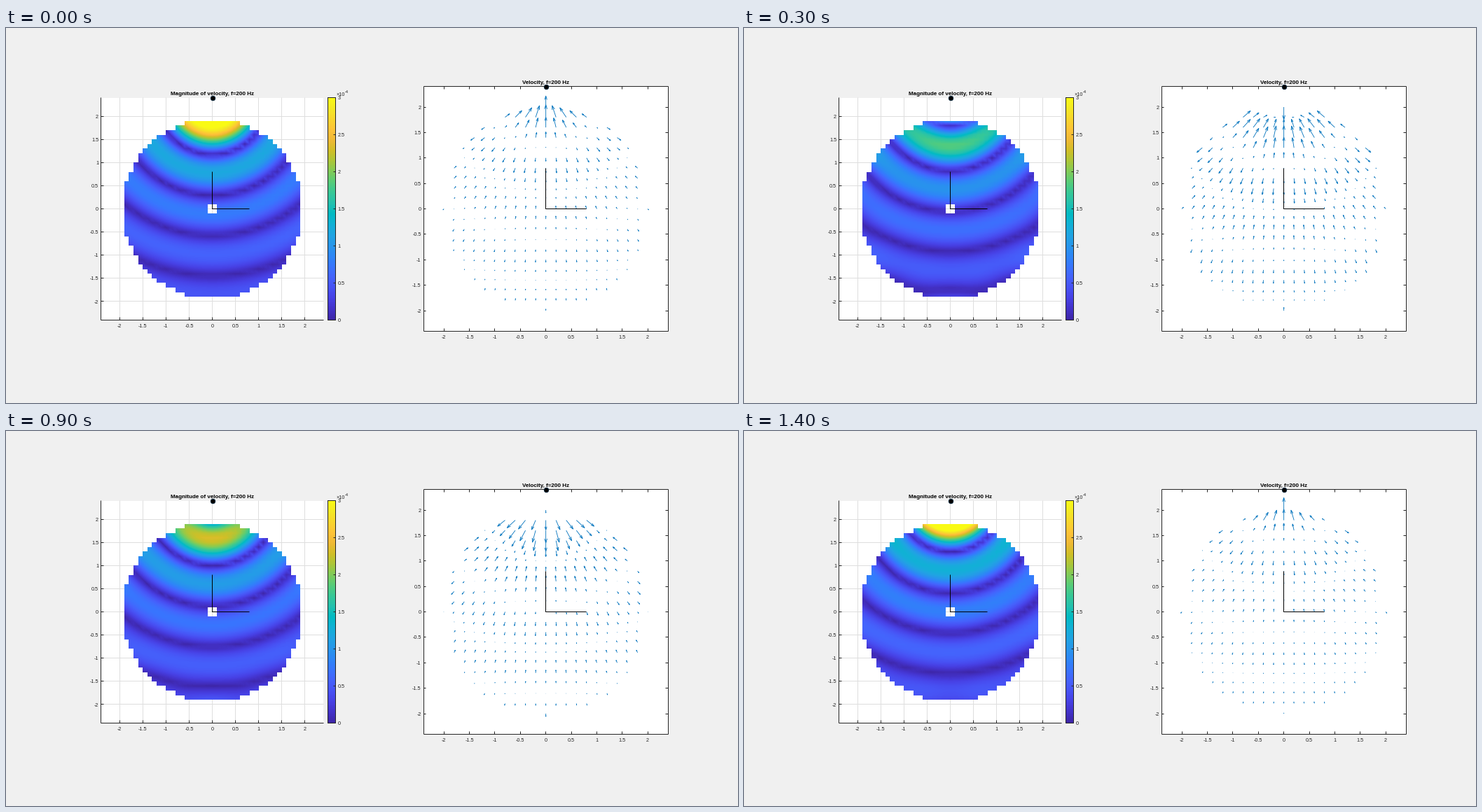
Write a matplotlib script that moves like this. It is 1045 px wide and 536 px high and loops after 1500 ms.

```python
import numpy as np
from numpy.polynomial import legendre
import matplotlib.pyplot as plt
from matplotlib.animation import FuncAnimation
from matplotlib.collections import LineCollection
from matplotlib.colors import LinearSegmentedColormap

W, H, DPI = 1045, 536, 100
STEPS = 15
PT = 72 / DPI                      # points per pixel
INK = (0.15, 0.15, 0.15)
BLUE = "#0072BD"

# Point source at distance DIST, expanded in spherical harmonics up to ORDER
ORDER, DIST, RADIUS = 10, 2.4, 2.0
FREQ, SPEED, DENSITY = 200, 343, 1.2
K = 2 * np.pi * FREQ / SPEED
NODES, WEIGHTS = legendre.leggauss(48)

plt.rcParams["font.family"] = "Liberation Sans"
plt.rcParams["axes.unicode_minus"] = False

PARULA = LinearSegmentedColormap.from_list("bowl", [
    (.2422, .1504, .6603), (.2647, .1978, .7952), (.2783, .2559, .8991),
    (.2810, .3228, .9579), (.2699, .3892, .9906), (.2206, .4603, .9973),
    (.1786, .5289, .9682), (.1540, .5902, .9218), (.1248, .6459, .8883),
    (.0689, .6948, .8394), (.0067, .7312, .7660), (.1408, .7584, .6842),
    (.2161, .7843, .5923), (.3406, .8008, .4789), (.5044, .7993, .3480),
    (.6720, .7793, .2227), (.8203, .7498, .1535), (.9393, .7288, .2100),
    (.9970, .7659, .2199), (.9786, .8386, .1766), (.9597, .9135, .1423),
    (.9769, .9839, .0805)])


def bessel_j(n, x):
    """Spherical Bessel function and its derivative, by quadrature."""
    wave = np.exp(1j * np.asarray(x)[..., None] * NODES)
    poly = WEIGHTS * legendre.legval(NODES, np.eye(n + 1)[n])
    turn = (-1j) ** n / 2
    return (turn * (wave @ poly)).real, (1j * turn * (wave @ (poly * NODES))).real


def hankel2(x):
    """Outgoing spherical Hankel functions of orders 0 to ORDER."""
    y = [-np.cos(x) / x, -np.cos(x) / x**2 - np.sin(x) / x]
    for n in range(1, ORDER):
        y.append((2 * n + 1) / x * y[n] - y[n - 1])
    return [bessel_j(n, x)[0] - 1j * y[n] for n in range(ORDER + 1)]


def velocity_field(count):
    """Grid and complex velocity inside the circle; NaN outside and at 0."""
    axis = np.linspace(-RADIUS, RADIUS, count)
    x, y = np.meshgrid(axis, axis)
    r = np.hypot(x, y)
    r[(r > RADIUS + 1e-9) | (r < 1e-9)] = np.nan
    sin, cos = x / r, y / r
    radial = np.zeros(r.shape, complex)
    polar = np.zeros(r.shape, complex)
    for n, h in enumerate(hankel2(K * DIST)):
        j, dj = bessel_j(n, K * r)
        coef = np.eye(n + 1)[n]
        radial += (2 * n + 1) * h * K * dj * legendre.legval(cos, coef)
        slope = legendre.legval(cos, legendre.legder(coef))
        polar -= (2 * n + 1) * h * j / r * sin * slope
    gain = 1 / (4 * np.pi * DENSITY * SPEED)
    return (x, y, gain * (radial * sin + polar * cos),
            gain * (radial * cos - polar * sin))


class Plot:
    """Maps data units of one panel to stage pixels."""

    def __init__(self, x0, y0, scale):
        self.x0, self.y0, self.scale = x0, y0, scale

    def px(self, x):
        return self.x0 + self.scale * x

    def py(self, y):
        return self.y0 - self.scale * y


left = Plot(294.55, 258.5, 66.2)
right = Plot(770.65, 258.5, 72.75)

fig = plt.figure(figsize=(W / DPI, H / DPI), dpi=DPI, facecolor="#f0f0f0")
ax = fig.add_axes([0, 0, 1, 1])
ax.axis("off")


def lines(segments, color=INK, z=5):
    """Crisp one-pixel lines through the pixels that hold the given points."""
    # snapping rounds to the nearest edge, so step back half a pixel first
    shifted = [np.subtract(s, 0.49) for s in segments]
    ax.add_collection(LineCollection(shifted, colors=[color], snap=True,
                                     linewidths=PT, zorder=z))


def label(x, y, text, size=7.27, **style):
    """Text whose digits are centred on y."""
    style = {"ha": "center", "color": INK, **style}
    ax.text(x, y + 0.36 * size, text, fontsize=size * PT, va="baseline",
            zorder=6, **style)


def panel(plot, boxed):
    lim, tick = 2.4, 3.5
    x1, x2 = plot.px(-lim), plot.px(lim)
    y1, y2 = plot.py(lim), plot.py(-lim)
    ax.fill([x1, x2, x2, x1], [y1, y1, y2, y2], color="w", lw=0, zorder=1)
    frame = [[(x1, y1), (x1, y2)], [(x1, y2), (x2, y2)]]
    if boxed:
        frame += [[(x1, y1), (x2, y1)], [(x2, y1), (x2, y2)]]
    grid = []
    for value in np.arange(-2, 2.1, 0.5):
        x, y = plot.px(value), plot.py(value)
        frame += [[(x, y2), (x, y2 - tick)], [(x1, y), (x1 + tick, y)]]
        if boxed:
            frame += [[(x, y1), (x, y1 + tick)], [(x2, y), (x2 - tick, y)]]
        grid += [[(x, y1), (x, y2)], [(x1, y), (x2, y)]]
        label(x, y2 + 8.5, f"{value:g}")
        label(x1 - 3.5, y, f"{value:g}", ha="right")
    if not boxed:
        lines(grid, (0.87, 0.87, 0.87), z=2)
    lines(frame)
    corner = [(plot.px(0), plot.py(0.8)), (plot.px(0), plot.py(0)),
              (plot.px(0.8), plot.py(0))]
    lines([corner], "k", z=7)
    ax.plot(plot.px(0), y1, "o", ms=6.6 * PT, mfc="k", mec="#06263f",
            mew=0.8 * PT, snap=False, zorder=8)


def colorbar():
    x1, x2, y1, y2 = 459.6, 470.6, left.py(2.4), left.py(-2.4)
    ax.imshow(np.linspace(1, 0, 256)[:, None], cmap=PARULA, aspect="auto",
              extent=(x1, x2, y2, y1), zorder=3)
    marks = [[(x1, y1), (x2, y1), (x2, y2), (x1, y2), (x1, y1)]]
    for i in range(7):
        y = y2 + (y1 - y2) * i / 6
        marks.append([(x2, y), (x2 - 3, y)])
        label(473.5, y, f"{i / 2:g}", ha="left")
    lines(marks)
    label(471, 94.2, "×10", ha="left")
    label(483.6, 91.2, "-4", 5.8, ha="left")


panel(left, False)
panel(right, True)
colorbar()
bold = dict(size=8, weight="bold", color="k")
label(left.x0, 93.2, "Magnitude of velocity, f=200 Hz", **bold)
label(right.x0, 77.2, "Velocity, f=200 Hz", **bold)

# Stage pixels under the disc, and the grid cell each one falls in
FINE = 41
_, _, map_u, map_v = velocity_field(FINE)
X1, X2, Y1, Y2 = 160, 430, 124, 394
col = ((np.arange(X1, X2) + 0.5 - left.x0) / left.scale + RADIUS) * 10
row = ((left.y0 - np.arange(Y1, Y2) - 0.5) / left.scale + RADIUS) * 10
col, row = np.meshgrid(col, row)
ci = np.clip(col.astype(int), 0, FINE - 2)
ri = np.clip(row.astype(int), 0, FINE - 2)
fx, fy = col - ci, row - ri


def shade(values):
    """Interpolate over two triangles per cell; drop cells with a NaN corner."""
    a, b = values[ri, ci], values[ri, ci + 1]
    c, d = values[ri + 1, ci], values[ri + 1, ci + 1]
    low = a + fx * (b - a) + fy * (c - a)
    high = d + (1 - fx) * (c - d) + (1 - fy) * (b - d)
    out = np.where(fx + fy <= 1, low, high)
    return np.ma.masked_invalid(np.where(np.isnan(a + b + c + d), np.nan, out))


disc = ax.imshow(np.zeros(col.shape), cmap=PARULA, vmin=0, vmax=3e-4,
                 extent=(X1, X2, Y2, Y1), aspect="auto",
                 interpolation="nearest", zorder=3)

COARSE = 21
arrow_x, arrow_y, arrow_u, arrow_v = velocity_field(COARSE)
inside = ~np.isnan(arrow_u)
base = np.stack([right.px(arrow_x[inside]), right.py(arrow_y[inside])], 1)
flow = np.stack([arrow_u[inside], -arrow_v[inside]], 1)
LONGEST = 0.9 * np.sqrt(2) * 2 * RADIUS / COARSE * right.scale

arrows = LineCollection([], colors=BLUE, linewidths=0.85 * PT, snap=False,
                        zorder=4)
ax.add_collection(arrows)
ax.set_xlim(0, W)
ax.set_ylim(H, 0)


def draw(step):
    phase = np.exp(2j * np.pi * step / STEPS)
    disc.set_data(shade(np.hypot((map_u * phase).real, (map_v * phase).real)))

    shaft = (flow * phase).real
    shaft *= LONGEST / np.hypot(*shaft.T).max()
    tip = base + shaft
    side = 0.33 * shaft[:, ::-1] * [-1, 1]
    heads = np.stack([tip - 0.33 * (shaft + side), tip,
                      tip - 0.33 * (shaft - side)], 1)
    arrows.set_segments(list(np.stack([base, tip], 1)) + list(heads))
    return disc, arrows


anim = FuncAnimation(fig, draw, frames=STEPS, interval=100, repeat=True)
plt.show()
```
